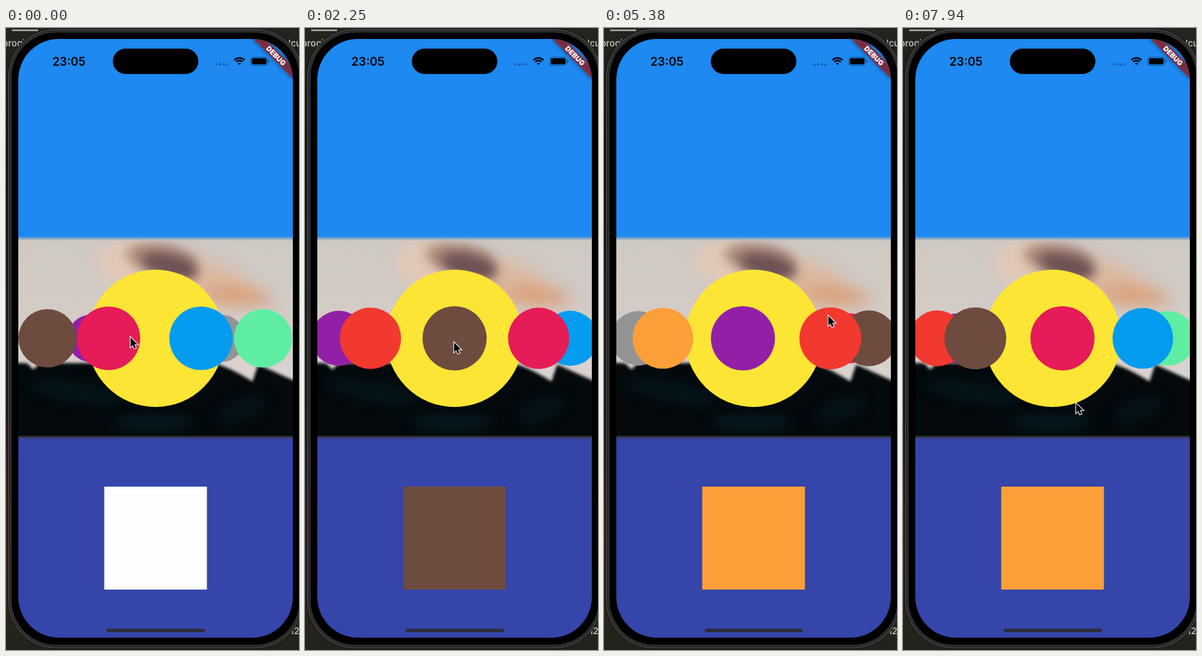
Animation, 428 px wide and 906 px high, one loop 8 s. Source, as an HTML page with a canvas:

```html
<!DOCTYPE html>
<html lang="en">
<head>
<meta charset="utf-8">
<title>Ring carousel</title>
<style>
  html, body { margin: 0; width: 100%; height: 100%; overflow: hidden; background: #161814; }
  canvas { display: block; }
</style>
</head>
<body>
<canvas id="stage" width="428" height="906"></canvas>
<script>
const W = 428, H = 906, LOOP = 8000;
const CX = 218.5, CY = 452, RING = 200, DOT = 46.8, DEPTH = 0.001;
const LEFT = 18, TOP = 16, WIDTH = 401, HEIGHT = 872, CORNER = 59;
const FONT = 'Inter, Roboto, sans-serif';
const SKY = '#1d89f1', INDIGO = '#3545a9';

const GREEN = '#5feda4', BLUE = '#039cef', PINK = '#e51c57', BROWN = '#6d4b3f', RED = '#f2392f',
  PURPLE = '#9120a6', ORANGE = '#fd9f38', GREY = '#949494', TEAL = '#048b7b';
// Each next item sits one step further left around the ring.
const ITEMS = [PINK, BROWN, RED, PURPLE, ORANGE, GREY, TEAL, GREEN, BLUE];
const STEP = 360 / ITEMS.length;

const TURN = 0.516; // degrees per dragged pixel
const SNAP = 300;
const START = { x: 181, y: 449.5, angle: -20.4, color: '#fdfdfd' };

const move = (at, time, x, y) => ({ at, time, x, y });
const drag = (...args) => ({ ...move(...args), drag: true });
const tap = (at, pick) => ({ at, pick });
const GESTURES = [
  drag(0, 1500, 268, 460), move(1550, 500, 217, 457), tap(2140, BROWN),
  move(2260, 340, 88, 448), tap(2640, RED), tap(3420, PURPLE), tap(3900, ORANGE),
  move(4330, 600, 413, 432), drag(5000, 650, 266, 408.5),
  move(6200, 500, 399, 450), drag(6700, 1300, 245, 550),
];

const progress = (t, from, time) => Math.min(1, Math.max(0, (t - from) / time));
const smooth = u => u * u * (3 - 2 * u);
const mix = (a, b, k) => a + (b - a) * k;

// Plays every gesture begun by time t; drags turn the ring, then it snaps to an item.
function pose(t) {
  let { x, y, angle, color } = START;
  for (const g of GESTURES.filter(g => g.at <= t)) {
    if (g.pick) {
      color = g.pick;
      angle = mix(angle, ITEMS.indexOf(g.pick) * STEP, smooth(progress(t, g.at, SNAP)));
      continue;
    }
    const u = progress(t, g.at, g.time);
    const k = g.drag ? u : smooth(u);
    if (g.drag) {
      angle += (g.x - x) * k * TURN;
      const rest = Math.round(angle / STEP) * STEP;
      angle = mix(angle, rest, smooth(progress(t, g.at + g.time, SNAP)));
    }
    x = mix(x, g.x, k);
    y = mix(y, g.y, k);
  }
  return { x, y, angle, color };
}

const stage = document.getElementById('stage').getContext('2d');

function layer(draw) {
  const canvas = document.createElement('canvas');
  canvas.width = W;
  canvas.height = H;
  draw(canvas.getContext('2d'));
  return canvas;
}

function fillRect(c, color, ...box) {
  c.fillStyle = color;
  c.fillRect(...box);
}

function fillRound(c, color, ...box) {
  c.fillStyle = color;
  c.beginPath();
  c.roundRect(...box);
  c.fill();
}

function blob(c, color, x, y, rx, ry = rx, tilt = 0) {
  c.fillStyle = color;
  c.beginPath();
  c.ellipse(x, y, rx, ry, tilt, 0, Math.PI * 2);
  c.fill();
}

function text(c, label, x, y, size, weight, color, align = 'center') {
  c.font = `${weight} ${size}px ${FONT}`;
  c.textAlign = align;
  c.fillStyle = color;
  c.fillText(label, x, y);
}

function fade(c, y0, y1, ...colors) {
  const g = c.createLinearGradient(0, y0, 0, y1);
  colors.forEach((color, i) => g.addColorStop(i / (colors.length - 1), color));
  return g;
}

function drawDesktop(c) {
  fillRect(c, fade(c, 0, H, '#24251f', '#10130f', '#161b1c', '#1b1a17', '#4a211a', '#1f231c'), 0, 0, W, H);
  fillRect(c, '#a5a5a2', 9, 2, 38, 2.5);
  text(c, 'progi', -5, 27, 13, 600, '#b9b8b4', 'left');
  text(c, 'lcu', 412.5, 27, 13, 600, '#b9b8b4', 'left');
  text(c, '.12', 412, 883, 13, 600, '#b9b8b4', 'left');
}

function drawBody(c) {
  const ring = (color, inset) =>
    fillRound(c, color, 2 + inset, 0.5 + inset, 433 - 2 * inset, 904 - 2 * inset, 71 - inset);
  ring('#0b0b0b', 0);
  ring('#555553', 1);
  ring('#282827', 2);
  ring('#3b3b3a', 5);
  ring('#000', 6);
}

// Height of the dark hills at x: a small dip on the left, a notch and a peak on the right.
function ridge(x) {
  const dip = 9 * Math.exp(-(((x - 40) / 6) ** 2));
  if (x < 300) return 488 + dip;
  if (x < 360) return 488 + 27 * ((x - 300) / 60) ** 1.4;
  return Math.max(490 + (x - 368) * 0.45, 515 - (x - 360) * 3);
}

function drawPhoto(c) {
  c.save();
  c.beginPath();
  c.rect(LEFT, 306, WIDTH, 290);
  c.clip();
  fillRect(c, fade(c, 306, 520, '#cfc8c3', '#d3cbc6', '#dbd4d2'), LEFT, 306, WIDTH, 290);

  c.filter = 'blur(11px)';
  blob(c, '#e2c8b5', 178, 342, 46, 32);
  blob(c, '#dcb8a0', 300, 368, 62, 26, 0.35);
  blob(c, '#d99f78', 338, 390, 52, 12, 0.08);
  c.filter = 'blur(8px)';
  blob(c, '#a98678', 228, 336, 52, 21, 0.15);
  blob(c, '#6b5152', 240, 347, 42, 17, 0.25);

  c.filter = 'blur(2px)';
  c.fillStyle = '#03090c';
  c.beginPath();
  c.moveTo(0, H);
  for (let x = 0; x <= W + 12; x += 2) c.lineTo(x, ridge(x));
  c.lineTo(W + 12, H);
  c.fill();
  c.filter = 'blur(8px)';
  blob(c, '#041419', 100, 530, 70, 16, 0.2);
  blob(c, '#05191f', 215, 574, 60, 12);
  blob(c, '#041318', 345, 555, 38, 18, -0.4);
  c.restore();

  fillRect(c, fade(c, 303, 311, SKY, '#8ba7c4', 'rgba(207,200,195,0)'), LEFT, 303, WIDTH, 8);
  fillRect(c, fade(c, 592, 599, 'rgba(3,9,12,0)', '#37393f', INDIGO), LEFT, 592, WIDTH, 7);
}

function drawStatus(c) {
  fillRound(c, '#000', 156, 30, 125, 37, 18.5);
  text(c, '23:05', 92, 54.5, 17, 600, '#000');
  for (let i = 0; i < 4; i++) blob(c, 'rgba(0,0,0,.28)', 307.7 + i * 5.2, 53, 1.8);

  c.strokeStyle = '#000';
  c.lineWidth = 2.3;
  for (const r of [10.4, 6.6, 2]) {
    c.beginPath();
    c.arc(341, 54, r, -Math.PI * 0.75, -Math.PI * 0.25);
    c.stroke();
  }

  c.strokeStyle = 'rgba(0,0,0,.42)';
  c.lineWidth = 1;
  c.beginPath();
  c.roundRect(357.5, 42.5, 24.5, 12, 3.8);
  c.stroke();
  fillRound(c, '#000', 359, 44, 21.5, 9, 2.5);
  fillRound(c, 'rgba(0,0,0,.45)', 383, 46.5, 1.5, 4, 1);
}

function drawBanner(c) {
  const band = [-41, 28.5, 82, 12.3];
  c.save();
  c.translate(LEFT + WIDTH, TOP);
  c.rotate(Math.PI / 4);
  c.filter = 'blur(3px)';
  fillRect(c, 'rgba(0,0,0,.5)', ...band);
  c.filter = 'none';
  fillRect(c, 'rgba(183,28,28,.63)', ...band);
  text(c, 'DEBUG', 0, 38.4, 10.2, 900, '#fff');
  c.restore();
}

function onScreen(c, draw) {
  c.save();
  c.beginPath();
  c.roundRect(LEFT, TOP, WIDTH, HEIGHT, CORNER);
  c.clip();
  draw(c);
  c.restore();
}

const backdrop = layer(c => {
  drawDesktop(c);
  drawBody(c);
  onScreen(c, () => {
    fillRect(c, SKY, LEFT, TOP, WIDTH, 292);
    fillRect(c, INDIGO, LEFT, 595, WIDTH, 293);
    drawPhoto(c);
    drawStatus(c);
    drawBanner(c);
    fillRound(c, '#2b2d38', 147, 875, 143.5, 5, 2.5);
  });
});

function drawRing(c, angle) {
  const dots = ITEMS.map((color, i) => {
    const a = (angle - i * STEP) * Math.PI / 180;
    const scale = 1 / (1 + DEPTH * RING * (1 - Math.cos(a)));
    return { color, z: Math.cos(a), x: CX + RING * Math.sin(a) * scale, r: DOT * scale };
  });
  dots.push({ color: '#fde535', z: 0, x: CX, r: 100 });
  dots.sort((p, q) => p.z - q.z);
  dots.forEach(d => blob(c, d.color, d.x, CY, d.r));
}

const arrow = new Path2D('M0 0V14.2L3.2 11.2L5.4 16.4L7.9 15.3L5.7 10.3H10.2Z');

function drawPointer(c, x, y) {
  c.save();
  c.translate(x + 0.8, y + 1);
  c.lineWidth = 2;
  c.strokeStyle = '#fff';
  c.stroke(arrow);
  c.fillStyle = '#000';
  c.fill(arrow);
  c.restore();
}

function render(t) {
  const { x, y, angle, color } = pose(t);
  stage.drawImage(backdrop, 0, 0);
  onScreen(stage, c => {
    drawRing(c, angle);
    fillRect(c, color, 143.5, 668, 150, 150);
  });
  drawPointer(stage, x, y);
}

const start = performance.now();
function tick() {
  render((performance.now() - start) % LOOP);
  requestAnimationFrame(tick);
}
tick();
</script>
</body>
</html>
```
